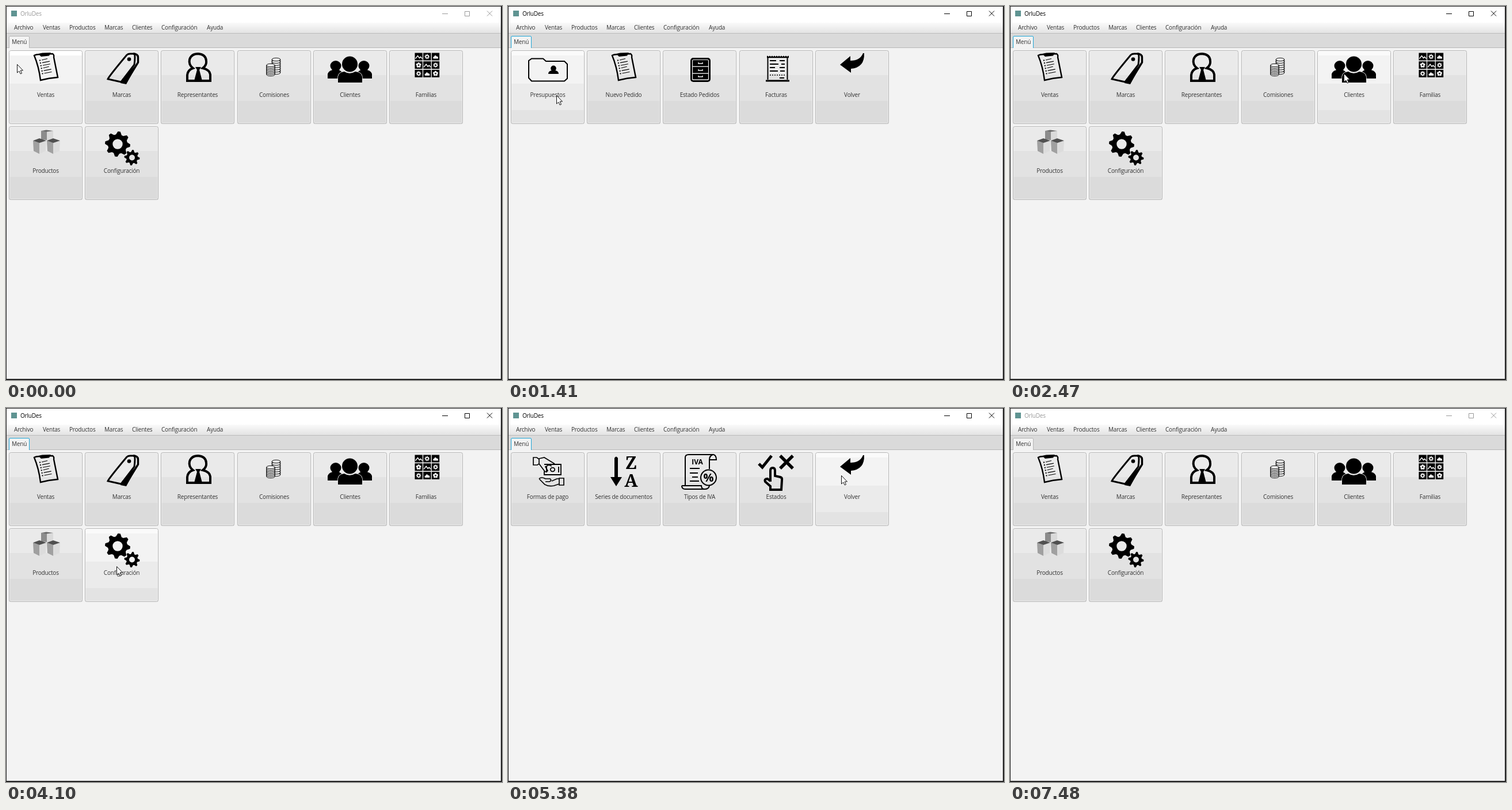
An HTML page with a canvas for the animation above (7580 ms loop, 862 by 650 pixels).

```html
<!DOCTYPE html>
<html lang="es">
<head>
<meta charset="utf-8">
<title>OrluDes</title>
<style>
html, body { margin: 0; width: 100%; height: 100%; overflow: hidden; background: #f3f3f3; }
canvas { display: block; }
</style>
</head>
<body>
<canvas id="stage" width="862" height="650"></canvas>
<script>
const ctx = document.getElementById('stage').getContext('2d');
const LOOP = 7580, BLUE = '#1fa5d6';
const UI_FONT = '10px "Open Sans", "Noto Sans", sans-serif';

function fill(path, color = '#000') {
  ctx.fillStyle = color;
  ctx.fill(new Path2D(path), 'evenodd');
}
function line(path, width = 2, color = '#000') {
  ctx.strokeStyle = color;
  ctx.lineWidth = width;
  ctx.stroke(new Path2D(path));
}
function rect(x, y, w, h, color) {
  ctx.fillStyle = color;
  ctx.fillRect(x, y, w, h);
}
function frame(x, y, w, h, radius, color, width = 1) {
  ctx.beginPath();
  ctx.roundRect(x, y, w, h, radius);
  ctx.strokeStyle = color;
  ctx.lineWidth = width;
  ctx.stroke();
}
function oval(x, y, rx, ry = rx, color = '#000') {
  ctx.beginPath();
  ctx.ellipse(x, y, rx, ry, 0, 0, 7);
  ctx.fillStyle = color;
  ctx.fill();
}
function text(s, x, y, color = '#333', align = 'left', font = UI_FONT) {
  ctx.font = font;
  ctx.letterSpacing = font === UI_FONT ? '-0.2px' : '0px';
  ctx.textAlign = align;
  ctx.fillStyle = color;
  ctx.fillText(s, x, y);
}
function gear(cx, cy, outer, inner, hole, color = '#000') {
  ctx.beginPath();
  for (let i = 0; i < 32; i++) {
    const angle = (i - 1.5) * Math.PI / 16 + .12;
    const r = i % 4 === 1 || i % 4 === 2 ? outer : inner;
    ctx.lineTo(cx + r * Math.cos(angle), cy + r * Math.sin(angle));
  }
  ctx.closePath();
  ctx.moveTo(cx + hole, cy);
  ctx.arc(cx, cy, hole, 0, 7);
  ctx.fillStyle = color;
  ctx.fill('evenodd');
}

// Icons are drawn relative to the corner of their tile.
const icons = {
  sheet() {
    line('M44 9Q47 7 54 7L76 6Q79 8 78 12L85 47Q70 48 55 52Q52 28 44 9Z', 2.4);
    fill('M51 6L58 4.5L73 4L70 9.5L56 11Z');
    for (let i = 0; i < 6; i++) {
      const x = 53 + i * .9, y = 17.5 + i * 4.6;
      rect(x, y - 1, 2, 2, '#000');
      line(`M${x + 4} ${y - .5}L${x + (i % 3 ? 17 : 14)} ${y - 3}`, 1.1);
    }
  },
  tag() {
    line('M73 8Q75 6 79 6L86 6Q88 9 86 25L63 55L40 50Q42 45 73 8Z', 3);
    line('M84 6Q92 6 92.5 12L92.5 21L71 56L63 55', 3.4);
    fill('M86 28L90 26L72 59L62 57L65 50Z');
    oval(77, 15.5, 3.3);
  },
  agent() {
    line('M56 31Q48 25 50 16Q53 6 65 6Q78 7 79 18Q80 26 73 31Q85 34 86 42L86 53H46V43Q47 34 56 31Z', 4);
    fill('M60 29H70L67 34L72 53H58L63 34Z');
  },
  coins() {
    const stack = (x, top, bottom) => {
      for (let y = bottom; y >= top - .1; y -= (bottom - top) / 6) {
        ctx.beginPath();
        ctx.ellipse(x, y, 7.3, 2.7, 0, 0, 7);
        ctx.fillStyle = '#ebebeb';
        ctx.fill();
        ctx.strokeStyle = '#111';
        ctx.lineWidth = 1;
        ctx.stroke();
      }
      line(`M${x - 7.3} ${top}V${bottom}M${x + 7.3} ${top}V${bottom}`, 1, '#111');
    };
    stack(67.5, 16, 39);
    stack(58, 26, 42);
  },
  people() {
    for (const side of [1, -1]) {
      ctx.save();
      ctx.translate(63.5, 0);
      ctx.scale(side, 1);
      oval(-24.5, 27, 9.5, 9);
      fill('M-38.5 49V41Q-37 36 -30 34H-19L-10 40V49Z');
      ctx.restore();
    }
    const body = 'M43 56V46Q44 38 54 37Q63 43 73 37Q84 38 85 46V56Z';
    line(body, 1.5, '#e5e5e5');
    oval(63.5, 24, 14.5, 14.5, '#e8e8e8');
    fill(body);
    oval(63.5, 24, 13.5, 13.5);
  },
  gallery() {
    [...'MGCFMGGCF'].forEach((kind, i) => {
      const x = 44.5 + i % 3 * 14.7, y = 4.5 + Math.floor(i / 3) * 14.7;
      rect(x, y, 13.3, 13, '#000');
      ctx.save();
      ctx.translate(x, y);
      const light = '#ededed';
      if (kind === 'M') {
        line('M1 10L5 5L8 9L10 7L13 10', 1.6, light);
      } else if (kind === 'G') {
        gear(6.6, 6.5, 4.5, 3.2, 1.5, light);
      } else if (kind === 'C') {
        fill('M3 10Q1 7 4 6.5Q6 2.5 8.5 6Q12 6 11 10Z', light);
      } else {
        for (let k = 0; k < 5; k++) oval(6.6 + 2.7 * Math.sin(k * 1.257), 6.5 - 2.7 * Math.cos(k * 1.257), 2, 2, light);
        oval(6.6, 6.5, 1.2);
      }
      ctx.restore();
    });
  },
  boxes() {
    fill('M56 8L66 9V24L56 23Z', '#8c8c8c');
    fill('M66 9L77 8V23L66 25Z', '#dadada');
    fill('M56 8L65 6.5L77 8L66 9.5Z', '#666');
    for (const x of [42, 66]) {
      ctx.save();
      ctx.translate(x, 0);
      fill('M0 25L11 29V48L1 43Z', '#a0a0a0');
      fill('M11 29L23 25L22 43L11 48Z', '#dcdcdc');
      fill('M0 25L11 21L23 25L11 29Z', '#505050');
      ctx.restore();
    }
  },
  gears() {
    gear(57, 31, 22, 17, 8.7);
    gear(82, 54.5, 13.5, 10, 5);
  },
  folder() {
    line('M31 21V48L36 53.5H93L98 49V24L93 19H61L56 14.5H36L31 18Z', 2);
    oval(74, 31.5, 4.8, 5);
    fill('M65 41Q65 36 71 35H77Q83 36 83 41Z');
  },
  cabinet() {
    ctx.beginPath();
    ctx.roundRect(48, 13, 35, 42, 5);
    ctx.fillStyle = '#000';
    ctx.fill();
    frame(51.5, 16.5, 28, 35, 2, '#eee', 1.2);
    for (const y of [17, 29, 40]) {
      rect(52, y + 10.5, 27, 1.4, '#e8e8e8');
      line(`M62 ${y + 4}V${y + 6}H69V${y + 4}`, 1.5, '#eee');
    }
  },
  receipt() {
    line('M49.5 51V13M83.5 51V13', 2);
    line('M48 12H86', 2.6);
    ctx.setLineDash([2, 2]);
    line('M48 10.5H86', 1.5);
    line('M53 43H80', 1.5);
    ctx.setLineDash([]);
    line('M46 53H87', 2.8);
    line('M53 18H64M70 18H79M53 24H68M73 24H79M53 30H62M53 36H67M71 36H79M70 30H79M70 48H78', 1.8);
  },
  back() {
    fill('M43 25L61 10V18Q78 18 83 5H85Q86 30 62 32V39Z');
  },
  payment() {
    line('M39 9H45L49 12V20L46 22H39ZM49 11L58 9L76 20M49 20L58 32Q61 36 64 32L60 25L66 22L71 24', 1.7);
    line('M58 21H87V39H58V33M62 25V35M83 25V35', 1.8);
    oval(72.5, 30, 4.6, 4.2);
    oval(72.5, 30, 2.8, 2.4, '#e6e6e6');
    line('M49 46Q53 42 60 46H68Q72 49 67 51H60M71 50L80 46H84M49 46L59 56Q66 60 75 58L84 55M84 45H92V57H84Z', 1.7);
  },
  sorting() {
    fill('M48 10Q51 5 54 10V43H61L51 59L41 43H48Z');
    text('Z', 77, 29, '#000', 'center', 'bold 30px "Noto Serif", serif');
    text('A', 77, 60, '#000', 'center', 'bold 31px "Noto Serif", serif');
  },
  tax() {
    line('M39 58V9Q39 4 45 4H88Q93 5 93 13H81V29M87 4Q81 6 81 13', 2);
    line('M33 58H67Q67 64 73 64H39Q33 64 33 58M73 64Q80 64 81 58', 2);
    text('IVA', 60, 20.5, '#000', 'center', 'bold 12px "Open Sans", sans-serif');
    line('M47 28H64M47 36H61M51 43H61M47 50H63', 2);
    ctx.beginPath();
    ctx.arc(79.5, 44, 13.5, 0, 7);
    ctx.fillStyle = '#e4e4e4';
    ctx.fill();
    ctx.strokeStyle = '#000';
    ctx.stroke();
    text('%', 79.5, 51, '#000', 'center', 'bold 20px "Open Sans", sans-serif');
  },
  states() {
    line('M34 20L40 26L56 6', 5);
    line('M71 6L93 28M93 6L71 28', 5.5);
    line('M54 51V32Q54 27 58 27Q62 27 62 32V41L71 43Q75 44 74 49L73 65H54V59L45 51Q43 46 49 46L54 50', 4);
  }
};

const menus = {
  main: [['Ventas', 'sheet'], ['Marcas', 'tag'], ['Representantes', 'agent'], ['Comisiones', 'coins'],
    ['Clientes', 'people'], ['Familias', 'gallery'], ['Productos', 'boxes'], ['Configuración', 'gears']],
  sales: [['Presupuestos', 'folder'], ['Nuevo Pedido', 'sheet'], ['Estado Pedidos', 'cabinet'],
    ['Facturas', 'receipt'], ['Volver', 'back']],
  setup: [['Formas de pago', 'payment'], ['Series de documentos', 'sorting'], ['Tipos de IVA', 'tax'],
    ['Estados', 'states'], ['Volver', 'back']]
};

// Each entry: start time, value held until the next entry.
const screens = [[0, 'main'], [540, 'sales'], [2470, 'main'], [4500, 'setup'], [5810, 'main']];
const focused = [[0, 'tab'], [390, 0], [540, 'tab'], [2220, 4], [2470, 'tab'],
  [4380, 7], [4500, 'tab'], [5660, 4], [5810, 'tab']];

// Pointer runs: first time, then one position every 120 ms.
const runs = [
  [0, '19,101 38,114'], [270, '39,115'], [690, '46,137 54,159'], [960, '60,161'], [1110, '81,161'],
  [1260, '85,158'], [1410, '84,155'], [1560, '215,88 341,106'], [1830, '338,104 450,124 559,131'],
  [2220, '580,117'], [2590, '562,124 510,146 446,172 380,197 318,218 271,231'],
  [3340, '250,262 224,288 202,284 193,278'], [4100, '192,275'],
  [4780, '210,258 286,190 386,125 482,94 552,92 579,117'], [5810, '580,117'],
  [5960, '590,220 616,369'], [6230, '665,480 724,585'], [6500, '757,620 782,647'], [6770, '900,700']
];
const pointer = runs.flatMap(([start, points]) =>
  points.split(' ').map((p, i) => [start + i * 120, p.split(',').map(Number)]));

const valueAt = (track, t) => track.findLast(step => step[0] <= t)[1];

function drawWindow(active, tabFocus) {
  rect(0, 0, 862, 650, '#222');
  rect(1, 1, 859, 647, '#f3f3f3');
  rect(1, 1, 859, 28, '#fff');
  rect(9, 8, 10, 10, '#5f9492');
  const ink = active ? '#000' : '#999';
  text('OrluDes', 25, 17, ink);
  line('M758 13.5H768M797.5 9.5H805.5V17.5H797.5ZM836 8.5L845 17.5M845 8.5L836 17.5', 1, ink);

  const bar = ctx.createLinearGradient(0, 29, 0, 47);
  bar.addColorStop(0, '#fafafa');
  bar.addColorStop(1, '#e3e3e3');
  rect(1, 29, 859, 18, bar);
  rect(1, 47, 859, 1, '#bcbcbc');
  const names = ['Archivo', 'Ventas', 'Productos', 'Marcas', 'Clientes', 'Configuración', 'Ayuda'];
  [14, 64, 110, 171, 219, 270, 349].forEach((x, i) => text(names[i], x, 41));

  rect(1, 48, 859, 24, '#dadada');
  rect(1, 72, 859, 1, '#b8b8b8');
  fill('M5 73V54Q5 52 7 52H39Q41 52 41 54V73Z', '#f3f3f3');
  line('M5.5 73V54Q5.5 52.5 7 52.5H39Q40.5 52.5 40.5 54V73', 1, tabFocus ? BLUE : '#b5b5b5');
  text('Menú', 10, 66);
}

function drawTile([label, icon], x, y, hover, focus, active) {
  const bands = hover
    ? [[0, active ? '#fafafa' : '#fff'], [9, '#f3f3f3'], [58, '#ebebeb'], [104, '#e3e3e3']]
    : [[0, '#eaeaea'], [43, '#e2e2e2'], [88, '#dbdbdb']];
  ctx.save();
  ctx.translate(x, y);
  ctx.save();
  ctx.beginPath();
  ctx.roundRect(0, 0, 128, 128, 3);
  ctx.clip();
  for (const [top, color] of bands) rect(0, top, 128, 128 - top, color);
  ctx.restore();
  frame(1.5, 1.5, 125, 125, 2, 'rgba(255,255,255,.4)');
  if (focus) frame(-.5, -.5, 129, 129, 4, 'rgba(31,165,214,.25)');
  frame(.5, .5, 127, 127, 3, focus ? BLUE : '#b6b6b6');
  icons[icon]();
  text(label, 64, 81, '#333', 'center');
  ctx.restore();
}

function drawPointer(x, y) {
  ctx.save();
  ctx.translate(x + .5, y + .5);
  const arrow = 'M0 0V14.5L3.3 11.5L5.7 16.5L8 15.5L5.7 10.5H10Z';
  fill(arrow, '#fff');
  line(arrow, 1, '#111');
  ctx.restore();
}

function draw(t) {
  const active = t >= 270 && t < 7480;
  const focus = valueAt(focused, t);
  const [px, py] = valueAt(pointer, t);
  drawWindow(active, active && focus === 'tab');
  menus[valueAt(screens, t)].forEach((item, i) => {
    const x = Math.round(5 + i % 6 * 132.2), y = 77 + Math.floor(i / 6) * 132;
    const hover = px >= x && px < x + 128 && py >= y && py < y + 128;
    drawTile(item, x, y, hover, focus === i, active);
  });
  drawPointer(px, py);
}

const start = performance.now();
function tick() {
  draw((performance.now() - start) % LOOP);
  requestAnimationFrame(tick);
}
tick();
</script>
</body>
</html>
```
